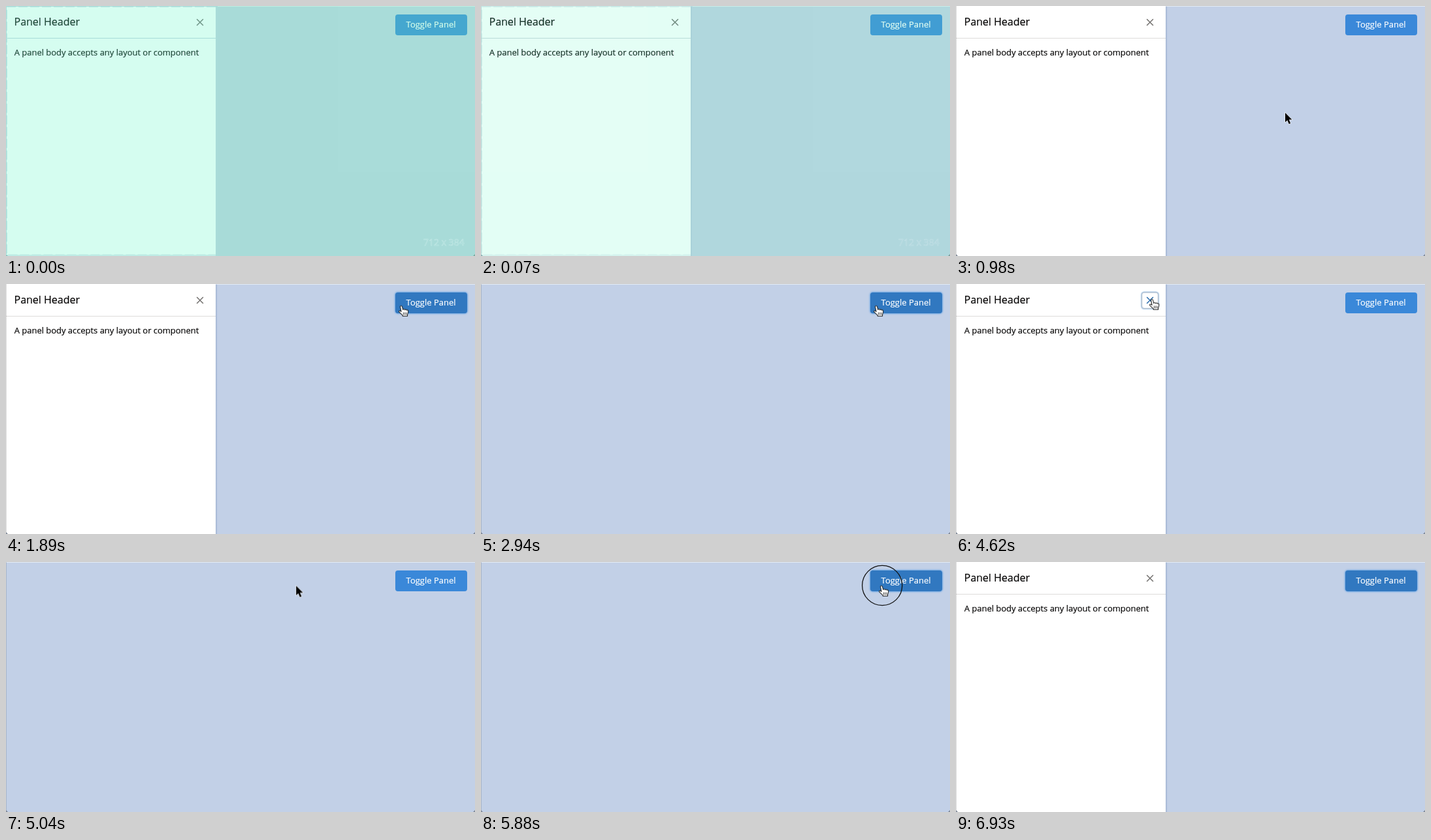
Recreate the animation shown at these times as an HTML page. Size 718 by 384 pixels, loop 7.07 s.

```html
<!DOCTYPE html>
<html lang="en">
<head>
<meta charset="utf-8">
<title>Toggle panel</title>
<style>
  html, body { margin: 0; width: 100%; height: 100%; overflow: hidden; background: #c2d0e7; }
  svg { display: block; width: 718px; height: 384px; }
  text { font: 13px "Open Sans", "Noto Sans", sans-serif; fill: #080707; stroke: #080707; stroke-width: .2px; }
  #header { font-size: 16px; }
  #body { font-size: 12.95px; }
  #label { fill: #fff; stroke: #fff; }
  #size { font-size: 14px; fill: none; stroke: #c6e9e7; stroke-width: .45px; }

  /* One shared 7070 ms loop; 70 ms is 0.99 % */
  .anim { animation: 7070ms step-end infinite; }

  #panel { animation-name: panel; }
  @keyframes panel {
    0%, 46.53%, 84.15%, 100% { opacity: 1; }
    27.72%, 66.33% { opacity: 0; }
  }

  #button { fill: #3a88d9; animation-name: button; }
  @keyframes button {
    0%, 63.36% { fill: #3a88d9; }
    19.8%, 76.23%, 100% { fill: #3178c0; }
  }

  #glow { filter: blur(1px); animation-name: glow; }
  @keyframes glow {
    0%, 63.36% { opacity: 0; }
    24.75%, 82.17%, 100% { opacity: .65; }
  }

  #cross { stroke: #747270; animation-name: cross; }
  @keyframes cross {
    0%, 66.33%, 100% { stroke: #747270; }
    60.39% { stroke: #2a6cac; }
  }

  #ring { animation-name: ring; }
  @keyframes ring {
    0%, 66.33%, 100% { opacity: 0; }
    63.36% { opacity: 1; }
  }

  #click { animation-name: click; }
  @keyframes click {
    0%, 26.73%, 45.54%, 65.34%, 84.15%, 100% { opacity: 0; }
    24.75%, 43.56%, 63.36%, 82.17% { opacity: 1; }
  }

  #arrow { animation-name: arrow; }
  @keyframes arrow {
    0%, 19.8%, 60.39%, 76.23%, 97.02%, 100% { opacity: 0; }
    5.94%, 48.51%, 66.33%, 88.11% { opacity: 1; }
  }

  #hand { animation-name: hand; }
  @keyframes hand {
    0%, 48.51%, 66.33%, 88.11%, 100% { opacity: 0; }
    19.8%, 60.39%, 76.23% { opacity: 1; }
  }

  #cursor { animation-name: cursor; }
  @keyframes cursor {
    0%     { transform: translate(386px, 380px); }
    5.94%  { transform: translate(386px, 380px); animation-timing-function: steps(3); }
    8.91%  { transform: translate(352px, 344px); }
    9.9%   { transform: translate(352px, 344px); animation-timing-function: steps(4); }
    13.86% { transform: translate(504px, 164px); animation-timing-function: steps(3); }
    16.83% { transform: translate(586px, 62px); animation-timing-function: steps(4); }
    20.79% { transform: translate(606px, 36px); animation-timing-function: steps(3); }
    23.76% { transform: translate(606px, 33px); }
    47.52% { transform: translate(606px, 33px); animation-timing-function: steps(4); }
    51.48% { transform: translate(470px, 22px); animation-timing-function: steps(7); }
    58.41% { transform: translate(309px, 22px); animation-timing-function: steps(3); }
    61.38% { transform: translate(301px, 23px); }
    67.32% { transform: translate(301px, 23px); animation-timing-function: steps(5); }
    72.27% { transform: translate(480px, 40px); animation-timing-function: steps(4); }
    76.23% { transform: translate(598px, 39px); animation-timing-function: steps(2); }
    78.21% { transform: translate(612px, 37px); animation-timing-function: steps(3); }
    81.18% { transform: translate(614px, 36px); }
    86.13% { transform: translate(614px, 36px); animation-timing-function: steps(5); }
    91.08% { transform: translate(520px, 180px); animation-timing-function: steps(6); }
    97.02%, 100% { transform: translate(367px, 384px); }
  }

  #intro { animation-name: intro; }
  @keyframes intro {
    0% { opacity: 1; }
    .99% { opacity: .66; }
    1.98% { opacity: .3; }
    2.97%, 100% { opacity: 0; }
  }
</style>
</head>
<body>
<svg viewBox="0 0 718 384">
  <defs>
    <linearGradient id="shade">
      <stop offset="0" stop-color="#9fb2d0"/>
      <stop offset="1" stop-color="#c2d0e7"/>
    </linearGradient>
  </defs>
  <rect width="718" height="384" fill="#c2d0e7"/>

  <g id="panel" class="anim">
    <rect x="321" width="3" height="384" fill="url(#shade)"/>
    <rect width="321" height="384" fill="#fff"/>
    <rect y="49" width="321" height="1" fill="#dddbda"/>
    <text id="header" x="12.5" y="30">Panel Header</text>
    <text id="body" x="12.8" y="76">A panel body accepts any layout or component</text>
    <g id="ring" class="anim" fill="none">
      <rect x="284" y="12.5" width="26" height="25.5" rx="4" stroke="#bcd5ee" stroke-width="2.5"/>
      <rect x="284.5" y="13" width="25" height="24.5" rx="3.5" stroke="#b5bcc5"/>
    </g>
    <path id="cross" class="anim" d="M292.5 20.5l9 9M301.5 20.5l-9 9" stroke-width="1.5" stroke-linecap="round"/>
  </g>

  <rect id="glow" class="anim" x="595" y="12" width="112" height="34" rx="5" fill="#3f8fe0"/>
  <rect id="button" class="anim" x="596" y="13" width="110" height="32" rx="4"/>
  <text id="label" x="612.6" y="33">Toggle Panel</text>

  <path d="M0 .5H718" stroke="#fff" stroke-opacity=".55"/>
  <path d="M.5 0V384" stroke="#000" stroke-opacity=".13"/>
  <path d="M0 381v3h3zM718 381v3h-3z" fill="#7d8695"/>

  <g id="cursor" class="anim">
    <circle id="click" class="anim" cx=".2" r="30.6" fill="none" stroke="#111" stroke-width="1.3"/>
    <path id="arrow" class="anim" d="M0 0V14.6l3.3-3.1 2.4 5.7 2.5-1-2.4-5.6h4.6z"
      fill="#000" stroke="#fff" stroke-width="1.1" paint-order="stroke"/>
    <g id="hand" class="anim" stroke="#222" stroke-linejoin="round" stroke-linecap="round">
      <g transform="translate(-.6 -.2) scale(1.08)">
        <path d="M-1.8 2C-1.8.2.8.2 1.1 2L2.1 6.2C2.6 4.9 4.5 5 4.8 6.4C5.3 5.4 7 5.6 7.3 6.8C8.2 6.1 9.5 6.7 9.6 8C9.8 10.6 9.3 11.6 8.5 13.2V15.2H1.7V14.2C.4 12.8-1.2 11.5-3.3 9.4C-4.2 8.2-2.8 7.1-1.5 7.9L-.3 8.8z" fill="#fff"/>
        <path d="M2.8 10.3v3M4.9 10.3v3M7 10.3v3" stroke-width=".8"/>
      </g>
    </g>
  </g>

  <g id="intro" class="anim">
    <rect x="321" width="3" height="384" fill="#c2d0e7"/>
    <rect width="321" height="384" fill="#64f8c8" fill-opacity=".27"/>
    <rect x="321" width="397" height="384" fill="#64fcb3" fill-opacity=".27"/>
    <path d="M0 49.5H321M321 .5H.5V383H321" fill="none" stroke="#a8dcd9"/>
    <path d="M321 1.5H1.5V382H321" fill="none" stroke="#b9e8e2" stroke-dasharray="14 4"/>
    <text id="size" x="639" y="368">712 x 384</text>
  </g>
</svg>
</body>
</html>
```
